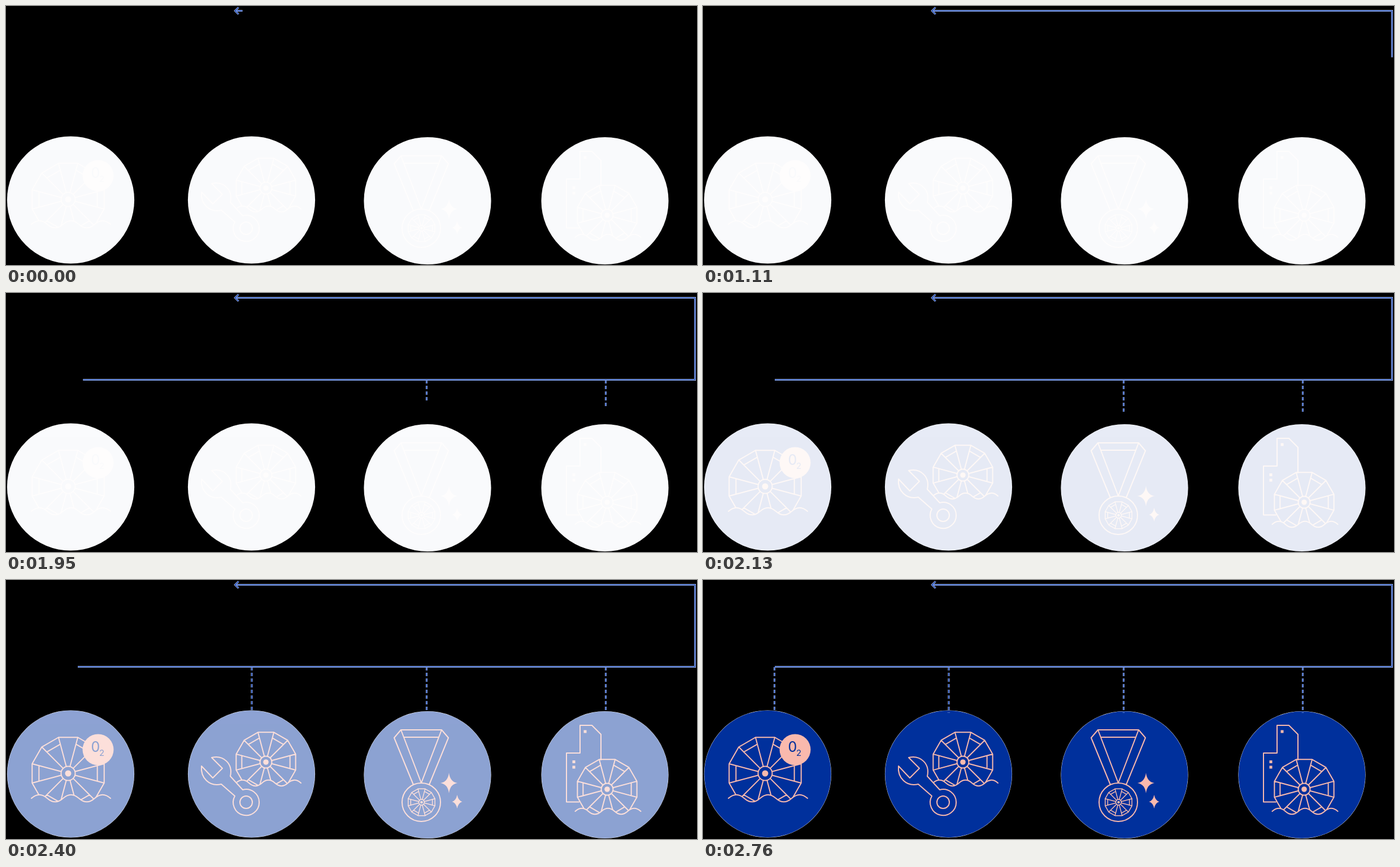
An HTML page that plays this animation: 1223 px wide and 458 px high, repeating every 3090 ms.

```html
<!DOCTYPE html>
<html lang="en">
<head>
<meta charset="utf-8">
<style>
  html, body { margin: 0; width: 100%; height: 100%; overflow: hidden; background: #000; }
  svg { display: block; }
  .icon { fill: none; stroke: #f9b9ad; stroke-width: 2; stroke-linejoin: round; stroke-linecap: round; }
  .icon .solid { fill: #f9b9ad; stroke: none; }
  .icon .base { fill: #00309c; stroke: none; }
  .icon .sea { fill: #00309c; stroke: none; }
  .icon text { fill: #00309c; stroke: none; font-family: Inter, "Open Sans", sans-serif; text-anchor: middle; }
  .glow, .ink { fill: none; }
  .glow { stroke: #dbe4fb; stroke-width: 3; }
  .ink { stroke: #0a3cb4; stroke-width: 1.6; }
  .drop { stroke-dasharray: 6 4; }
</style>
</head>
<body>
<svg width="1223" height="458" viewBox="0 0 1223 458"></svg>
<script>
const svg = document.querySelector('svg');
const LOOP = 3090, STEP = 30, LAST = 2760;

const circle = (x, y, r, cls = '') => `<circle class="${cls}" cx="${x}" cy="${y}" r="${r}"/>`;
const path = (d, extra = '') => `<path d="${d}" ${extra}/>`;
const square = (x, y) => `<rect class="solid" x="${x - 2.5}" y="${y - 2.5}" width="5" height="5"/>`;

// Twelve-sided paddle wheel with an inner chord in every second segment
function wheel(x, y, r, hub, dot) {
  const at = (deg, k) => {
    const a = deg * Math.PI / 180;
    return `${(x + k * Math.cos(a)).toFixed(2)} ${(y + k * Math.sin(a)).toFixed(2)}`;
  };
  let rim = '', inner = '';
  for (let i = 0; i < 12; i++) {
    const deg = 15 + 30 * i;
    rim += (i ? 'L' : 'M') + at(deg, r);
    inner += `M${at(deg, hub)}L${at(deg, r)}`;
    if (i % 2) inner += `M${at(deg, r * .81)}L${at(deg + 30, r * .81)}`;
  }
  return path(rim + 'Z' + inner) + circle(x, y, hub) + circle(x, y, dot, 'solid');
}

// Water line that hides the lower part of a wheel
function water(x, y, half) {
  const wave = `M${x} ${y}q${half / 2} ${-half * .45} ${half} 0` + `t${half} 0`.repeat(4);
  return path(wave + 'v24h' + -5 * half + 'z', 'class="sea"') + path(wave);
}

const star = (x, y, w, h) =>
  path(`M${x} ${y - h}Q${x + 2} ${y - 2} ${x + w} ${y}Q${x + 2} ${y + 2} ${x} ${y + h}` +
       `Q${x - 2} ${y + 2} ${x - w} ${y}Q${x - 2} ${y - 2} ${x} ${y - h}Z`, 'class="solid"');

const oxygen = wheel(110, 342, 66, 12.5, 5.5) + water(45, 386, 28) +
  circle(163, 300, 27.5, 'solid') +
  '<text x="158.5" y="304" font-size="25">0</text><text x="169.5" y="311" font-size="15">2</text>';

const repair = wheel(460, 322, 54.5, 10.5, 4.8) + water(407, 359, 23) +
  path('M419 371A23 23 0 1 1 405 382L381 361C360 366 344 350 346 329L366 350L383 333' +
       'L364 314C385 309 402 325 397 347Z', 'class="base"') +
  path('M419 371A23 23 0 1 1 405 382L381 361C360 366 344 350 346 329L366 350L383 333' +
       'L364 314C385 309 402 325 397 347Z') +
  circle(425, 393, 11);

const medal = path('M721 362L687 279L699 265H771L783 279L749 362M699 265L735 359L771 265M704 278H766') +
  circle(735, 393, 34) +
  `<g stroke-width="1.5">${wheel(735.5, 393, 24.5, 5, 2.3)}</g>` +
  star(784, 359, 15, 18) + star(798.5, 392, 9, 12);

const mill = path('M1014 392.5H992V306H1016V257H1037L1053 273V318') +
  square(1025, 268) + square(1005, 321.5) + square(1005, 331) +
  wheel(1064, 370, 54.5, 10.5, 4.8) + water(1007.5, 409, 23.2);

const discs = [
  [114.5, 343, oxygen], [434.5, 343, repair], [746, 344.5, medal], [1060, 344.5, mill]
];

// x position, then time and lower end pairs
const drops = [
  [1061.5, 1540, 154, 2020, 212, 2130, 212, 2410, 235],
  [744.5, 1664, 154, 2110, 212, 2130, 212, 2410, 235],
  [435, 2140, 154, 2410, 235],
  [126.5, 2420, 154, 2690, 231]
];

const twin = cls => `<path class="glow ${cls}"/><path class="ink ${cls}"/>`;
svg.innerHTML =
  discs.map(([x, y, art]) => circle(x, y, 112.6, 'disc') +
    `<g class="icon">${circle(x, y, 112.2, 'base')}${art}</g>`).join('') +
  drops.map((_, i) => twin('drop d' + i)).join('') +
  twin('route') + twin('head');
svg.querySelectorAll('.disc').forEach(c => c.setAttribute('fill', '#fff'));

const icons = svg.querySelectorAll('.icon');
const draw = (cls, d) => svg.querySelectorAll('.' + cls).forEach(p => p.setAttribute('d', d));
draw('head', 'M411.5 2.5L405.5 8.5L411.5 14.5');

const clamp = x => Math.min(1, Math.max(0, x));
const sine = x => (1 - Math.cos(Math.PI * clamp(x))) / 2;

function ramp(t, keys) {
  if (t <= keys[0]) return keys[1];
  for (let i = 2; i < keys.length; i += 2) {
    const [t0, v0, t1, v1] = keys.slice(i - 2, i + 2);
    if (t <= t1) return v0 + (v1 - v0) * (t - t0) / (t1 - t0);
  }
  return keys[keys.length - 1];
}

function route(t) {
  const top = 1 - (1 - clamp(t / 790)) ** 1.35;
  let d = `M406 8.5H${418.5 + 801 * top}`;
  if (t > 785) d += `V${8.5 + 145 * sine((t - 785) / 600)}`;
  if (t > 1391) d += `H${1219.5 - 1092.5 * sine((t - 1391) / 594)}`;
  return d;
}

function render() {
  const now = performance.now() % LOOP;
  const t = Math.min(LAST, Math.floor(now / STEP) * STEP);
  draw('route', route(t));
  drops.forEach(([x, ...keys], i) => {
    const end = ramp(t, keys);
    draw('d' + i, end > 154 ? `M${x} 154V${end}` : '');
  });
  const alpha = ramp(t, [1950, .02, 2130, .094, 2400, .447, 2550, .706, 2760, 1]);
  icons.forEach(g => g.setAttribute('opacity', alpha));
  requestAnimationFrame(render);
}
render();
</script>
</body>
</html>
```
